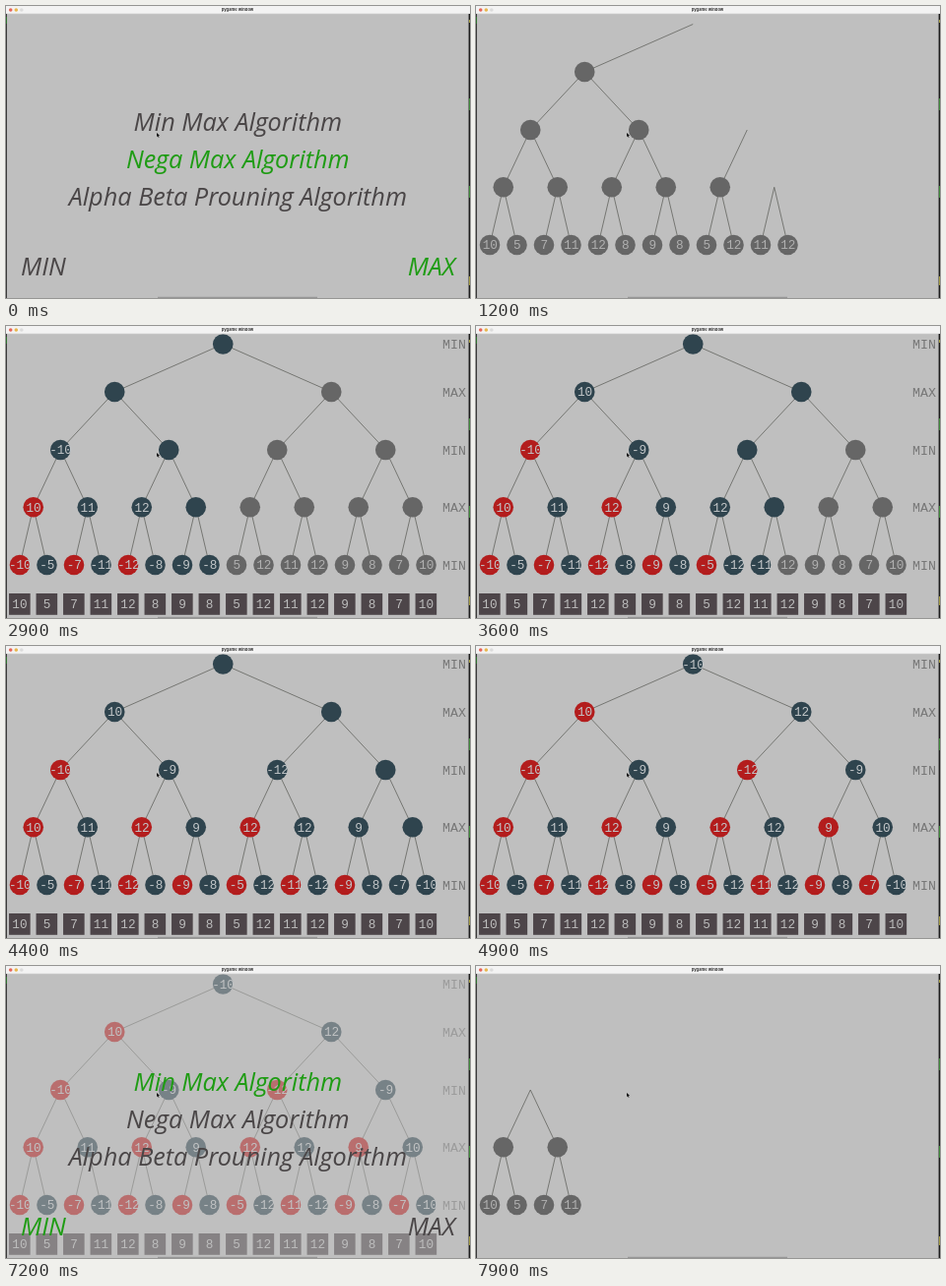
Recreate the animation shown at these times as an HTML page with a canvas. Size 471 px wide and 297 px high, loop 8 s.

```html
<!DOCTYPE html>
<html>
<head>
<meta charset="utf-8">
<style>
html, body { margin: 0; width: 100%; height: 100%; overflow: hidden; background: #bfbfbf; }
canvas { display: block; }
</style>
</head>
<body>
<canvas id="stage" width="471" height="297"></canvas>
<script>
const ctx = document.getElementById('stage').getContext('2d');
const LOOP = 8000;
const BG = '#bfbfbf', GRAY = '#666666', DARK = '#2f444e', RED = '#b31d1d';
const INK = '#4a4647', GREEN = '#1f9c14', TILE = '#4d4549';
const MONO = '"Liberation Mono", monospace';
const ROW_Y = [18.5, 67, 126, 184.3, 243];
const LEAVES = [10, 5, 7, 11, 12, 8, 9, 8, 5, 12, 11, 12, 9, 8, 7, 10];

// Timeline in ms
const BUILD = 852, REBUILD = 7790, NODE_STEP = 17;
const VISIT = 1390, VISIT_STEP = 100;
const MENU = 4950, PICK_MIN_MAX = 6100, SIDES = 6600, PICK_MIN = 6900;

// Full binary tree: post-order for building, pre-order for the search
const nodes = [];
let built = 0, visited = 0;
function makeNode(depth, index, parent) {
  const span = 440 / 2 ** depth;
  const node = { x: 0.25 + span * (index + 0.5), y: ROW_Y[depth], parent, leaf: depth === 4 };
  node.visit = visited++;
  if (node.leaf) {
    node.raw = LEAVES[index];
    node.value = -node.raw;
  } else {
    const kids = [0, 1].map(k => makeNode(depth + 1, index * 2 + k, node));
    node.value = Math.max(...kids.map(k => -k.value));
    kids[0].first = true;
  }
  node.done = node.leaf ? node.visit : visited;
  node.order = ++built;
  nodes.push(node);
  return node;
}
makeNode(0, 0, null);

function text(str, x, y, font, color, align = 'center') {
  ctx.font = font;
  ctx.fillStyle = color;
  ctx.textAlign = align;
  ctx.fillText(str, x, y);
}

function rect(x, y, w, h, color) {
  ctx.fillStyle = color;
  ctx.fillRect(x, y, w, h);
}

function disc(x, y, r, color) {
  ctx.fillStyle = color;
  ctx.beginPath();
  ctx.arc(x, y, r, 0, 7);
  ctx.fill();
}

function drawNode(node, tick) {
  const seen = tick >= node.visit;
  const chosen = node.first && tick >= node.parent.done;
  disc(node.x, node.y, 10.3, !seen ? GRAY : chosen ? RED : DARK);
  const label = tick >= node.done ? node.value : node.raw;
  if (label !== undefined) {
    text(label, node.x + 0.3, node.y + 4.3, '12.7px ' + MONO, seen ? '#c2c6c8' : '#b0b0b0');
  }
}

function drawTree(count, tick) {
  const shown = nodes.filter(n => n.order <= count);
  ctx.strokeStyle = '#62645f';
  ctx.lineWidth = 0.8;
  ctx.beginPath();
  for (const n of shown) {
    if (!n.parent) continue;
    ctx.moveTo(n.parent.x, n.parent.y);
    ctx.lineTo(n.x, n.y);
  }
  ctx.stroke();
  shown.forEach(n => drawNode(n, tick));
  if (count < nodes.length) return;
  ROW_Y.forEach((y, i) => text(i % 2 ? 'MAX' : 'MIN', 455, y + 4.5, '13.3px ' + MONO, '#777777'));
  LEAVES.forEach((v, i) => {
    const x = 13.75 + 27.5 * i;
    rect(x - 10.7, 272, 21.6, 21.8, TILE);
    text(v, x + 0.2, 287.3, '12.7px ' + MONO, '#bcbcbc');
  });
}

function drawMenu(picked, side) {
  const font = 'italic 25.3px "Open Sans", sans-serif';
  ['Min Max Algorithm', 'Nega Max Algorithm', 'Alpha Beta Prouning Algorithm'].forEach((line, i) =>
    text(line, 235.3, 126.8 + 38 * i, font, i === picked ? GREEN : INK));
  if (!side) return;
  text('MIN', 15, 273.5, font, side === 'MIN' ? GREEN : INK, 'left');
  text('MAX', 456, 273.5, font, side === 'MAX' ? GREEN : INK, 'right');
}

function drawWindow() {
  rect(0, 0, 471, 8, '#f3f3f3');
  rect(0, 7.6, 471, 0.6, '#d0d0d0');
  disc(4.7, 4, 1.8, '#e8655a');
  disc(10.3, 4, 1.8, '#e9b64c');
  disc(15.8, 4, 1.8, '#dcdcdc');
  text('pygame window', 235, 5.4, 'bold 4.1px Inter, sans-serif', '#333333');
  rect(0, 8, 0.8, 289, '#1c1c1c');
  rect(0, 11, 0.9, 7, '#2f7a2f');
  rect(469.6, 8, 1.4, 289, '#1c1c1c');
  for (let i = 0; i < 12; i++) {
    rect(470, 14 + (i * 89) % 270, 1, 3, i % 3 ? '#3f8a3a' : '#a39a40');
  }
  rect(154, 295.8, 162, 1.2, '#989898');
}

function drawPointer() {
  ctx.fillStyle = '#111111';
  ctx.beginPath();
  [[153, 129], [153, 133], [154, 132.3], [154.8, 133.8], [155.5, 133.4], [154.9, 132], [156, 131.8]]
    .forEach(([x, y]) => ctx.lineTo(x, y));
  ctx.fill();
}

function draw(t) {
  rect(0, 0, 471, 297, BG);
  if (t < BUILD) {
    drawMenu(1, 'MAX');
  } else if (t >= REBUILD) {
    drawTree(Math.floor((t - REBUILD) / NODE_STEP), -1);
  } else {
    drawTree(Math.floor((t - BUILD) / NODE_STEP), Math.floor((t - VISIT) / VISIT_STEP));
    if (t >= MENU) {
      rect(0, 0, 471, 297, 'rgba(191,191,191,0.5)');
      drawMenu(t < PICK_MIN_MAX ? 1 : 0, t < SIDES ? '' : t < PICK_MIN ? 'MAX' : 'MIN');
    }
  }
  drawWindow();
  drawPointer();
}

const start = performance.now();
function frame() {
  draw((performance.now() - start) % LOOP);
  requestAnimationFrame(frame);
}
frame();
</script>
</body>
</html>
```
